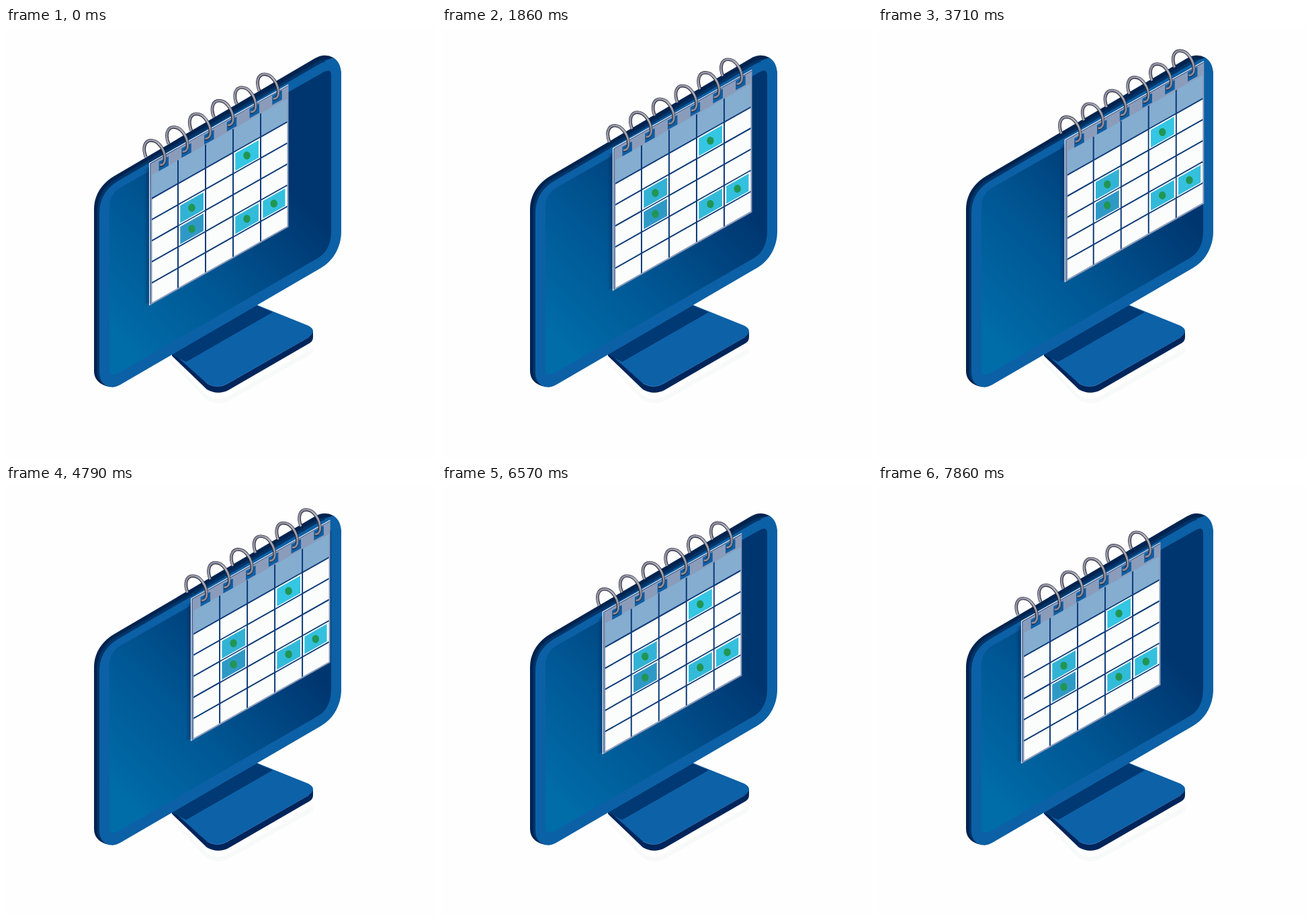
An HTML page for the animation above (7.93 s loop, 640 px wide and 640 px high).

```html
<!DOCTYPE html>
<html lang="en">
<head>
<meta charset="utf-8">
<title>Calendar on a monitor</title>
<style>
  html, body { margin: 0; width: 100%; height: 100%; overflow: hidden; background: #fefefe; }
  svg { display: block; width: 100vw; height: 100vh; }
</style>
</head>
<body>
<svg viewBox="0 0 640 640">
  <defs>
    <linearGradient id="screen" gradientUnits="userSpaceOnUse" x1="175" y1="465" x2="410" y2="230">
      <stop offset="0" stop-color="#006ca8"/>
      <stop offset=".45" stop-color="#005794"/>
      <stop offset="1" stop-color="#003670"/>
    </linearGradient>
    <linearGradient id="shade">
      <stop offset="0" stop-color="#002a60" stop-opacity="0"/>
      <stop offset="1" stop-color="#002a60" stop-opacity=".5"/>
    </linearGradient>
    <linearGradient id="metal" gradientUnits="userSpaceOnUse" x1="204" y1="170" x2="239" y2="200">
      <stop offset="0" stop-color="#83859a"/>
      <stop offset=".45" stop-color="#b0b1bf"/>
      <stop offset="1" stop-color="#83859a"/>
    </linearGradient>
    <g id="ring" fill="none">
      <path d="M227.500 199L242 191V205L227.500 213Z" fill="#0d5fa6"/>
      <path d="M208.300 192C203 179 206 167.300 216 167.300C228 167.300 236.500 183 236.500 195C236.500 201 233 205 229 204" stroke="#24242f" stroke-width="4.700"/>
      <path d="M208 192C202.700 179 206 167 216 167C228 167 236.800 183 236.800 195C236.800 201 233 204.600 229 203.600" stroke="url(#metal)" stroke-width="3"/>
    </g>
  </defs>

  <g id="stand">
    <path d="M246 493L298 546Q315 557 332 547L457 476V484L333 554Q315 564 297 552L244 496Z" fill="#f8f9f9"/>
    <path d="M247 484L373 412L457 452V460Q457 466 452 469L331 539Q315 547 299 538L247 488Z" fill="#00255a"/>
    <path d="M249 484L373 412L450 443Q463 450 452 459L330 529Q315 538 299 529L252 487Z" fill="#0d61a7"/>
    <path d="M299 529Q315 538 330 529L451 460" fill="none" stroke="#3b79bd" stroke-width=".8"/>
    <path d="M247 486L373 413L397 423L268 497Z" fill="#003973"/>
  </g>

  <g id="monitor">
    <path d="M131 270C131 249 142 232 160 221L460 45Q474 37 487 44L497 60L160 534.500L149 533Q131 527 131 510Z" fill="#00234f"/>
    <path d="M135.500 273C135.500 252 146 235 164 224.500L463 50.500Q478 43 490 48L497 62L160 534L152 533Q135.500 527 135.500 512Z" fill="#003468"/>
    <path d="M139 275C139 254 150 237 168 227L464 55C484 44 499 50 499 70V303C499 325 488 346 469 357L170 531C154 540 139 531 139 513Z" fill="#0c60a5"/>
    <path d="M487 44Q499 51 499 70L480 60L474 49Z" fill="#0c60a5"/>
    <path d="M154 267C154 252 160 243 173 236L472 66Q484 59 484 70V302C484 320 478 334 465 342L169 513Q154 521 154 510Z" fill="url(#screen)"/>
  </g>

  <g id="calendar">
    <g id="sheet" transform="matrix(1 -.565 0 1 213 201)">
      <rect x="-8" y="6" width="8" height="202" fill="url(#shade)"/>
      <rect width="207.500" height="212.500" fill="#8b9cbb"/>
      <path d="M.6 212V.5H207" fill="none" stroke="#f4f6fa" stroke-width="1.200"/>
      <path d="M1.900 211V1.800H207" fill="none" stroke="#274a7c" stroke-width=".9"/>
      <rect x="4.500" y="20" width="201" height="35" fill="#84add0"/>
      <rect x="4.500" y="55" width="201" height="155" fill="#fbfdfc"/>
    </g>
    <g id="rings"></g>
  </g>
</svg>
<script>
const LOOP = 7930, TRAVEL = { x: 65, y: -35 }, SKEW = .565;
const HEADER = 55, ROW = 31.4, COLUMN = 41, FIRST = 2, PAGE_END = 205.5;
const calendar = document.getElementById('calendar');
const sheet = document.getElementById('sheet');

function add(parent, tag, attributes) {
  const node = document.createElementNS('http://www.w3.org/2000/svg', tag);
  for (const key in attributes) node.setAttribute(key, attributes[key]);
  parent.appendChild(node);
}

const line = (d, width) => add(sheet, 'path', { d, stroke: '#0d3a78', 'stroke-width': width });
for (let i = 0; i < 5; i++) line(`M4 ${HEADER + i * ROW}H${PAGE_END}`, 2.3);
for (let i = 1; i < 5; i++) line(`M${FIRST + i * COLUMN} 20V210`, 2);

const events = [
  [3, 0, '#34c6e3'], [1, 1, '#32b3d5'], [1, 2, '#2f99c6'],
  [3, 3, '#32bbd9'], [4, 3, '#34c0de']
];
for (const [column, row, fill] of events) {
  const x = FIRST + column * COLUMN, y = HEADER + row * ROW;
  const width = Math.min(COLUMN, PAGE_END - x);
  add(sheet, 'rect', { x: x + 1, y: y + 1, width: width - 2, height: 29.4, fill: '#fff' });
  add(sheet, 'rect', { x: x + 3.3, y: y + 3, width: width - 6.3, height: 26, fill });
  // The dot undoes the sheet's skew, so it stays upright.
  add(sheet, 'ellipse', {
    rx: 5.2, ry: 6, fill: '#219653',
    transform: `matrix(1 ${SKEW} 0 1 ${x + width / 2} ${y + 16})`
  });
}

const rings = document.getElementById('rings');
for (let i = 0; i < 6; i++) add(rings, 'use', { href: '#ring', x: i * 33.75, y: i * -19.7 });

// Cubic Bézier easing (.333, 0, .39, 1), solved by bisection.
function ease(u) {
  let low = 0, high = 1;
  for (let i = 0; i < 24; i++) {
    const s = (low + high) / 2, r = 1 - s;
    const x = 3 * r * s * (.333 * r + .39 * s) + s ** 3;
    if (x < u) low = s; else high = s;
  }
  return low * low * (3 - 2 * low);
}

function render(now) {
  const t = now % LOOP;
  const p = ease(Math.min(t, LOOP - t) / (LOOP / 2));
  calendar.setAttribute('transform', `translate(${TRAVEL.x * p} ${TRAVEL.y * p})`);
}

const start = performance.now();
function tick() {
  render(performance.now() - start);
  requestAnimationFrame(tick);
}
tick();
</script>
</body>
</html>
```
